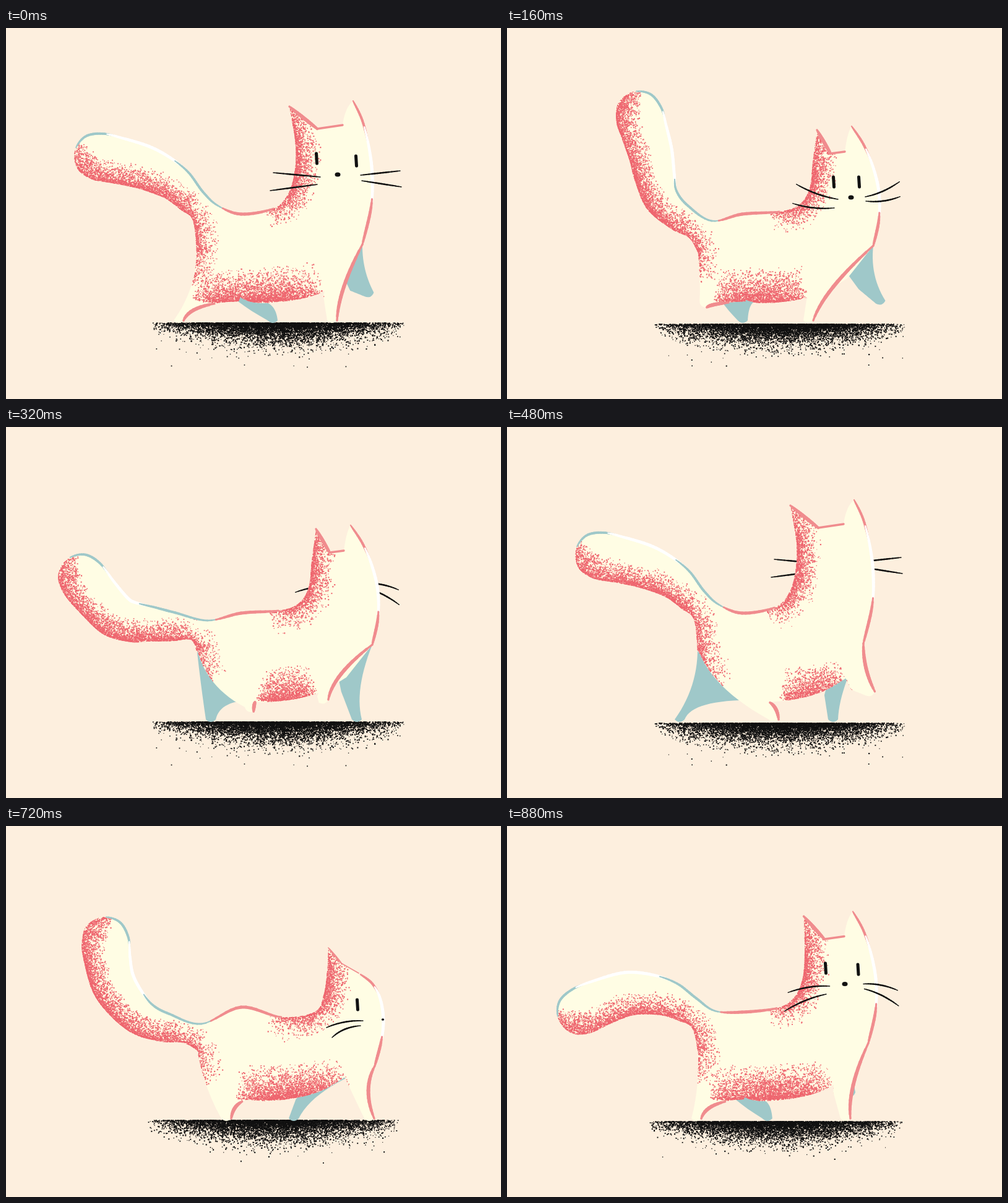
An HTML page with a canvas for the animation above (920 ms loop, 800 by 600 pixels).

```html
<!DOCTYPE html>
<html lang="en">
<head>
<meta charset="utf-8">
<title>Walking cat</title>
<style>
html, body { margin: 0; width: 100%; height: 100%; overflow: hidden; background: #fdefde; }
canvas { display: block; }
</style>
</head>
<body>
<canvas id="stage" width="800" height="600"></canvas>
<script>
const ctx = document.getElementById('stage').getContext('2d');
const PAPER = '#fdefde', CREAM = '#fffde4', ROSE = '#ee666f', PINK = '#f08c8e', TEAL = '#9fc8c9', INK = '#111';
const STEP = 80, LOOP = 920, SAMPLES = 8;
const { PI, sin, cos, min, hypot } = Math;

const points = s => s.trim().split(/\s+/).map(p => p.split(',').map(Number));
const mix = (a, b, f) => a.map((v, i) => Array.isArray(v) ? mix(v, b[i], f) : v + (b[i] - v) * f);

// Tail centre line from root to tip, one per pose of the six-step swing
const tailHigh = points('316,300 277,255 220,225 148,208');
const tailUp = points('305,325 250,278 232,205 213,140');
const tails = [tailHigh, mix(tailHigh, tailUp, .5), tailUp,
  points('290,333 222,313 173,255 160,185'),
  points('300,326 235,319 177,306 122,244'),
  points('310,312 265,281 195,272 119,300')];

// Neck (5 points up to the ear tip), notch between the ears (2), face and chest (6)
const headHigh = points(`432,292 455,270 466,235 468,190 458,127 503,163 544,157
  561,118 576,150 587,195 592,240 590,290 576,350`);
const headLow = points(`440,297 472,286 489,260 494,218 501,165 523,203 546,200
  557,159 576,188 591,223 601,265 601,310 592,352`);
const headSide = points(`445,309 500,300 514,270 519,235 521,197 542,222 570,238
  573,240 592,255 605,280 610,315 606,350 596,388`);

// Two eyes, nose, whisker roots (two left, two right)
const faceHigh = points('502,211 566,215 536,237 508,241 503,253 573,238 575,247');
const faceLow = points('528,249 569,249 556,274 535,277 529,291 579,273 580,280');

let seed = 1;
const rand = () => (seed = (seed * 48271) % 2147483647) / 2147483647;

function spline(p) {
  const out = [];
  for (let i = 0; i < p.length - 1; i++) {
    const a = p[i - 1] || p[i], b = p[i], c = p[i + 1], d = p[i + 2] || c;
    for (let s = 0; s < SAMPLES; s++) {
      const t = s / SAMPLES;
      out.push([0, 1].map(j => b[j] + t / 2 * (c[j] - a[j] + t * (2 * a[j] - 5 * b[j] + 4 * c[j] - d[j]
        + t * (3 * (b[j] - c[j]) + d[j] - a[j])))));
    }
  }
  return [...out, p[p.length - 1]];
}

function quad(a, b, c, n = 14) {
  return Array.from({ length: n + 1 }, (_, i) => mix(mix(a, b, i / n), mix(b, c, i / n), i / n));
}

const section = (line, from, to) => line.slice(Math.round(from * SAMPLES), Math.round(to * SAMPLES) + 1);

function addShape(path, line) {
  line.forEach(([x, y], i) => i ? path.lineTo(x, y) : path.moveTo(x, y));
  path.closePath();
}

// Brush line, thinner at both ends
function brush(line, color, width) {
  ctx.strokeStyle = color;
  const n = line.length - 1;
  for (let i = 0; i < n; i++) {
    ctx.lineWidth = width * (.35 + .65 * sin(PI * (i + .5) / n) ** .5);
    ctx.beginPath();
    ctx.moveTo(...line[i]);
    ctx.lineTo(...line[i + 1]);
    ctx.stroke();
  }
}

function speck(x, y) {
  const size = 1 + rand() * 1.2;
  ctx.fillRect(x - size / 2, y - size / 2, size, size);
}

// Grain that thins out to the right of the line's direction
function spray(line, depth) {
  ctx.fillStyle = ROSE;
  const n = line.length - 1;
  for (let i = 0; i < n; i++) {
    const [x, y] = line[i], dx = line[i + 1][0] - x, dy = line[i + 1][1] - y;
    const len = hypot(dx, dy) || 1;
    const count = len * depth * .36 * sin(PI * (i + .5) / n) ** .6;
    for (let k = 0; k < count; k++) {
      const u = rand(), d = depth * rand() * rand() / len, blur = (rand() - .5) * 4;
      speck(x + dx * u - dy * d + blur, y + dy * u + dx * d + blur);
    }
  }
}

function drawShadow(variant) {
  const cx = 440 - variant % 2 * 6, top = 477 + [0, -1, 2, 1][variant];
  ctx.fillStyle = INK;
  for (let i = 0; i < 7000; i++) {
    const u = (rand() + .75 * rand() - .875) / .875;
    speck(cx + u * 205, top + 62 * rand() * rand() * (.4 + .6 * rand()) * (1 - .5 * u * u));
  }
  for (let i = 0; i < 150; i++) speck(cx + (rand() + rand() - 1) * 220, top + 75 * rand() * rand());
}

// Outline points around the tail: underside, round tip, upper side back to the root
function tailOutline(spine) {
  const line = spline(spine), n = 6, under = [], upper = [], cap = [];
  for (let i = 0; i <= n; i++) {
    const at = i * (line.length - 1) / n, p = line[at];
    const from = line[Math.max(0, at - 1)], to = line[min(line.length - 1, at + 1)];
    const angle = Math.atan2(to[1] - from[1], to[0] - from[0]), r = 18 + 20 * sin(PI / 2 * i / n);
    const around = turn => [p[0] + r * cos(angle + turn), p[1] + r * sin(angle + turn)];
    under.push(around(-PI / 2));
    if (i) upper.unshift(around(PI / 2));
    if (i === n) for (let j = -1; j <= 1; j++) cap.push(around(j * PI / 4));
  }
  return [...under, ...cap, ...upper];
}

function paw(x, y, tilt) {
  const dx = 8 * cos(tilt), dy = 8 * sin(tilt);
  return [[x - dx, y - dy], [x + dx, y + dy]];
}

// A leg swings forward for half of the twelve steps and slides back for the rest
function hindLeg(phase) {
  const p = phase % 12;
  const x = p < 6 ? 355 - 76 * cos(PI * p / 6) : 431 - 25 * (p - 6);
  const lift = p < 5 ? 28 * sin(PI * p / 5) : 0, [l, r] = paw(x, 473 - lift, lift * .028);
  const end = [395 + (x - 355) * .25, 442];
  return { back: [[308, 356], [318 + (x - 355) * .12, 420], l],
    front: [r, [r[0] + (end[0] - r[0]) * .12, 445], end], inner: [400, 380] };
}

function foreLeg(phase, chestEnd) {
  const p = (phase + 9) % 12;
  const x = p < 6 ? 465 + 141 * sin(PI * p / 9) : 587 - 20 * (p - 6);
  const lift = p < 6 ? 42 * sin(PI * p / 6) ** .5 : 0, [l, r] = paw(x, 473 - lift, -lift * .01);
  const armpit = 505 + (x - 516) * .72, start = [armpit, 436 - (armpit - 500) * .2];
  return { back: [start, mix(start, l, .5), l],
    front: [r, [r[0] + (540 - r[0]) * .35, 425 - lift * .8], chestEnd], inner: [530, 370] };
}

function addLeg(path, { back, front, inner }) {
  const l = back[2], r = front[0];
  const sole = [(l[0] + r[0] + l[1] - r[1]) / 2, (l[1] + r[1] + r[0] - l[0]) / 2];
  addShape(path, [...quad(...front).reverse(), ...quad(r, sole, l, 8), ...quad(...back).reverse(), inner]);
}

function drawWhisker([x, y], side, row, lift) {
  const end = [x + side * ((side < 0 ? 76 : 64) - Math.abs(lift) * .5), y + lift + (row ? 10 : -7)];
  const bend = [(x + end[0]) / 2, (y + end[1] - lift) / 2 + lift * .1];
  brush(quad([x, y], bend, end), INK, 2.5);
}

function drawWhiskers(k, dip, rise) {
  const roots = mix(faceHigh, faceLow, dip).slice(3), lift = -20 * sin(PI * k / 3);
  roots.forEach(([x, y], i) => drawWhisker([x, y - rise], i < 2 ? -1 : 1, i % 2, lift));
}

function drawEye([x, y]) {
  ctx.strokeStyle = INK;
  ctx.lineWidth = 5;
  ctx.beginPath();
  ctx.moveTo(x - .5, y - 8);
  ctx.lineTo(x + .5, y + 8);
  ctx.stroke();
}

function drawNose([x, y], size) {
  ctx.fillStyle = INK;
  ctx.beginPath();
  ctx.ellipse(x, y, size, size * .8, 0, 0, 2 * PI);
  ctx.fill();
}

function drawCat(k) {
  const pose = k % 6, sideways = pose === 3, away = k > 3 && k < 9;
  const dip = min(1, min(pose, 6 - pose) / 2);
  const head = sideways ? headSide : mix(headHigh, headLow, dip);
  const neck = head.slice(0, 5), notch = head.slice(5, 7), face = head.slice(7);
  const earTip = neck[4], chestEnd = face[5];
  const [rootX, rootY] = tails[pose][0];

  const back = spline([[308, 362], ...tailOutline(tails[pose]), [rootX + 26, rootY - 13],
    [380, sideways ? 293 : 301], ...neck]);
  const chest = spline(face);
  const belly = spline([[550, 405], [505, 430], [445, 443], [390, 441], [340, 405]]);
  const ear = quad(notch[1], [notch[1][0] + 4, face[0][1] + 10], face[0]);
  const hind = hindLeg(k), fore = foreLeg(k, chestEnd);

  if (away && !sideways) drawWhiskers(k, dip, 20);

  const farLegs = new Path2D();
  addLeg(farLegs, hindLeg(k + 6));
  addLeg(farLegs, foreLeg(k + 6, chestEnd));
  ctx.fillStyle = TEAL;
  ctx.fill(farLegs);

  const cat = new Path2D();
  addShape(cat, [...back, ...notch, ...ear, ...chest, ...belly]);
  addLeg(cat, hind);
  addLeg(cat, fore);
  ctx.fillStyle = CREAM;
  ctx.fill(cat);

  ctx.save();
  ctx.clip(cat);
  spray([...quad(...hind.back).slice(0, 8).reverse(), ...section(back, 0, 9.6)], 38);
  spray(section(back, 18.8, 23), 40);
  const left = [hind.front[1][0] + 6, 441], right = fore.back[0];
  spray(quad(right, [(left[0] + right[0]) / 2, 449], left, 24), 58);
  ctx.restore();

  brush(section(back, 9.3, 11.8), TEAL, 4);
  brush(section(back, 11.3, 15), '#fff', 5);
  brush(section(back, 14.2, 17.3), TEAL, 4);
  brush(section(back, 17.2, 19), PINK, 5);
  brush([...quad(earTip, mix(earTip, notch[0], .5), notch[0]), notch[1]], PINK, sideways ? 3 : 6);
  brush(section(chest, 0, 2), PINK, 4);
  brush(section(chest, 1.2, 4.4), '#fff', 5);
  brush(section(chest, 3.8, 5), PINK, 5);
  brush(quad(...fore.front), PINK, 6);
  brush(quad(...hind.front).slice(0, 11), PINK, 6);

  if (sideways) {
    drawEye([568, 289]);
    drawNose([609, 313], 2.2);
    brush(quad([577, 315], [545, 314], [518, 326]), INK, 2.5);
    brush(quad([573, 323], [545, 325], [527, 342]), INK, 2.5);
  } else if (!away) {
    const [eyeA, eyeB, nose] = mix(faceHigh, faceLow, dip);
    drawEye(eyeA);
    drawEye(eyeB);
    drawNose(nose, 4.5);
    drawWhiskers(k, dip, 0);
  }
}

let shown = -1;
function play(now) {
  const k = Math.floor(now % LOOP / STEP);
  if (k !== shown) {
    shown = k;
    ctx.fillStyle = PAPER;
    ctx.fillRect(0, 0, 800, 600);
    ctx.lineCap = 'round';
    seed = 1234 + k % 4 * 777;
    drawShadow(k % 4);
    drawCat(k);
  }
  requestAnimationFrame(play);
}
play(0);
</script>
</body>
</html>
```
